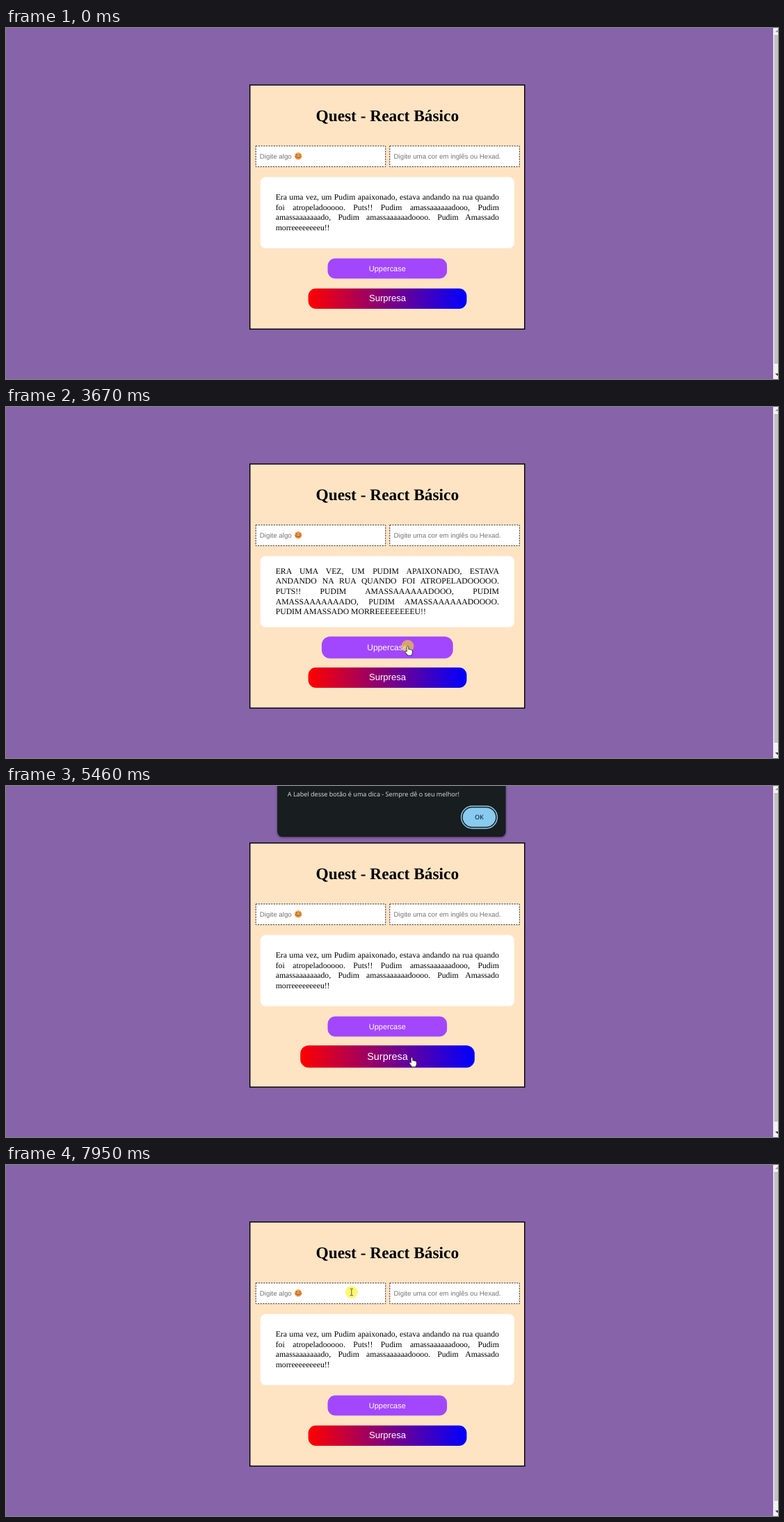
These frames come from a looping animation (1110 px wide and 505 px high, 8 s). An HTML page:

```html
<!DOCTYPE html>
<html lang="pt-BR">
<head>
<meta charset="utf-8">
<title>Quest - React Básico</title>
<style>
  html, body { margin: 0; width: 100%; height: 100%; overflow: hidden; background: #8763a9; }
  svg { display: block; width: 1110px; height: 505px; }
  text { text-rendering: geometricPrecision; }
  .serif { font-family: "Liberation Serif", "Times New Roman", serif; }
  .sans { font-family: "Liberation Sans", Arial, sans-serif; }
  .ui { font-family: "Open Sans", "Noto Sans", sans-serif; }
  .middle { text-anchor: middle; }
  .hint { font-size: 9.73px; fill: #757575; }
  .field { fill: #fff; stroke: #000; stroke-width: .8; stroke-dasharray: 2.19 1.46; }
  .story {
    display: flex; align-items: center; width: 440px; height: 140px;
    font-size: 16px; line-height: 20px; color: #000; text-align: justify;
    text-rendering: geometricPrecision;
  }
  .story p { margin: 0; width: 440px; }
  .upper { text-transform: uppercase; }
  #cursor path { fill: #fff; stroke: #111; stroke-width: .8; stroke-linejoin: round; }
  #cursor #beam { fill: none; stroke: #333; }
</style>
</head>
<body>
<svg viewBox="0 0 1110 505">
  <defs>
    <linearGradient id="redBlue"><stop stop-color="#f00"/><stop offset="1" stop-color="#00f"/></linearGradient>
    <filter id="shadow" x="-5%" y="-20%" width="110%" height="150%">
      <feDropShadow dx="0" dy="1" stdDeviation="1.5" flood-color="#000" flood-opacity=".5"/>
    </filter>
  </defs>

  <rect width="1110" height="505" fill="#8763a9"/>

  <!-- scrollbar -->
  <rect x="1103" width="7" height="505" fill="#f1f1f1"/>
  <rect x="1104.4" y="10" width="6" height="473" fill="#c1c1c1"/>
  <path d="M1106 6l3.2-3.4 3.2 3.4z" fill="#a0a0a0"/>
  <path d="M1106 497l3.2 3.4 3.2-3.4z" fill="#404040"/>

  <!-- card -->
  <rect x="350.7" y="82" width="395" height="351.2" fill="#ffe4c4" stroke="#000" stroke-width="1.46"/>
  <text class="serif middle" x="548.3" y="133.7" font-size="23.36" font-weight="700">Quest - React Básico</text>

  <rect class="field" x="359.2" y="169.8" width="186.5" height="29.8"/>
  <text class="sans hint" x="364.8" y="187.8">Digite algo</text>
  <g transform="translate(420.2 184.2)">
    <circle r="5.2" fill="#eda04a"/>
    <circle cx="-3.2" cy="1" r="1.3" fill="#e0703f"/>
    <circle cx="3.2" cy="1" r="1.3" fill="#e0703f"/>
    <path d="M-3.2-1.1q1.1-1.6 2.2 0M1-1.1q1.1-1.6 2.2 0M-2.5 1.5q2.5 2.6 5 0" fill="none" stroke="#5e3a2c" stroke-width=".9"/>
  </g>
  <rect class="field" x="551.8" y="169.8" width="186.5" height="29.8"/>
  <text class="sans hint" x="557.6" y="187.8">Digite uma cor em inglês ou Hexad.</text>

  <rect x="365.8" y="214.6" width="365" height="102.2" rx="7.3" fill="#fff"/>
  <foreignObject width="440" height="140" transform="translate(387.7 215) scale(.73)">
    <div class="story serif"><p id="story">Era uma vez, um Pudim apaixonado, estava andando na rua quando foi atropeladooooo. Puts!! Pudim amassaaaaaadooo, Pudim amassaaaaaaado, Pudim amassaaaaaadoooo. Pudim Amassado morreeeeeeeeu!!</p></div>
  </foreignObject>

  <g id="caseButton">
    <rect x="-85.8" y="-14.4" width="171.6" height="28.8" rx="11" fill="#a347ff"/>
    <text class="sans middle" y="3.8" font-size="10.95" fill="#fff">Uppercase</text>
  </g>
  <g id="surpriseButton">
    <rect x="-113.9" y="-14.6" width="227.8" height="29.2" rx="11" fill="url(#redBlue)"/>
    <text class="sans middle" y="4" font-size="13.14" fill="#fff">Surpresa</text>
  </g>

  <g id="dialog" class="ui">
    <g transform="translate(-554.3)">
      <rect x="390.6" y="-30" width="327.4" height="106.8" rx="7.5" fill="#181c1e" filter="url(#shadow)"/>
      <text x="405.3" y="19.2" font-size="9.05" fill="#e3e6e8">A Label desse botão é uma dica - Sempre dê o seu melhor!</text>
      <rect x="654.2" y="32.9" width="51.6" height="31.8" rx="15.9" fill="none" stroke="#8bd3f5" stroke-width="1.4"/>
      <rect x="656.4" y="35" width="47.2" height="27.6" rx="13.8" fill="#8acdf1"/>
      <text class="middle" x="680" y="52.1" font-size="9" font-weight="600" fill="#143a4c">OK</text>
    </g>
  </g>

  <g id="cursor">
    <circle id="glow" r="9" fill="#fff000" fill-opacity=".55"/>
    <path id="arrow" d="M0 0V9.9L2.2 7.9 3.7 11.4 5.3 10.7 3.8 7.3H6.8Z"/>
    <path id="hand" d="M-1.3 1Q0-.8 1.3 1V4.5Q2.5 3.8 3.3 4.9 4.6 4.4 5.2 5.6 6.7 5.3 6.9 6.9V9.6Q6.8 11.4 5.8 12.2V13.7H-.4V12.5Q-2 10.8-3.6 8.4-3.8 6.6-2.3 7L-1.3 8Z"/>
    <path id="beam" d="M-2.2-4.7H-.6L0-4.2.6-4.7H2.2M0-4.2V4.4M-2.2 4.9H-.6L0 4.4.6 4.9H2.2"/>
  </g>
</svg>
<script>
const LOOP = 8000, TICK = 68, PRESS = 66, FADE = 130, SETTLE = 200;
const el = id => document.getElementById(id);
const clamp = v => Math.min(1, Math.max(0, v));
const easeOut = (v, power) => 1 - (1 - v) ** power;

const entry = { at: 1100, x: 1075, y: 489 };

// pointer moves; easeX and easeY are ease-out powers
const moves = [
  { from: 1170, to: 1170, x: 1096, y: 494 },
  { from: 1302, to: 1710, x: 765, y: 422 },
  { from: 1710, to: 2130, x: 577.5, y: 344, easeY: 1.5 },
  { from: 4730, to: 5130, x: 583.5, y: 390.5 },
  { from: 6186, to: 7000, x: 686, y: 42, easeX: 6, easeY: 4 },
  { from: 7332, to: 7880, x: 496.8, y: 182.8, easeX: 1.5 }
];

const clicks = { upper: 2330, lower: 3670, open: 5324, close: 7200, focus: 7945 };
const released = name => clicks[name] + PRESS;

const buttons = {
  caseButton: { x: 548.3, y: 346, w: 171.6, h: 28.8 },
  surpriseButton: { x: 548.5, y: 389.3, w: 227.8, h: 29.2 }
};
const fields = [
  { x: 452.5, y: 184.7, w: 186.5, h: 29.8 },
  { x: 645, y: 184.7, w: 186.5, h: 29.8 }
];

const inside = (p, box) => Math.abs(p.x - box.x) < box.w / 2 && Math.abs(p.y - box.y) < box.h / 2;

// Position advances once per tick within each move.
function pointer(t) {
  let { x, y } = entry;
  for (const { from, to, easeX = 1, easeY = 1, ...goal } of moves) {
    if (t < from) break;
    const elapsed = Math.floor((t - from) / TICK) * TICK;
    const k = t >= to ? 1 : elapsed / (to - from);
    x += (goal.x - x) * easeOut(k, easeX);
    y += (goal.y - y) * easeOut(k, easeY);
  }
  return { x, y };
}

function cursorShape(t, p, hover, modal) {
  if (t < entry.at) return "";
  if (modal && p.y < 77) return "arrow";
  if (hover) return "hand";
  return fields.some(box => inside(p, box)) ? "beam" : "arrow";
}

function place(id, x, y, scale = 1) {
  el(id).setAttribute("transform", `translate(${x} ${y}) scale(${scale})`);
}

function show(id, opacity) {
  el(id).setAttribute("opacity", +opacity);
}

function renderDialog(t) {
  const k = clamp((t - released("open")) / SETTLE);
  const rest = (1 - k) ** 2;
  const leaving = clamp((t - released("close")) / FADE);
  place("dialog", 554.3, -9.5 * rest, 1 + .008 * rest);
  show("dialog", k > 0 ? clamp(.62 + k) * (1 - leaving) : 0);
}

function render(t) {
  const during = (start, end) => t >= released(start) && t < released(end);
  const p = pointer(t);
  const modal = during("open", "close");
  // The page keeps its hover state while the dialog is open.
  const pagePoint = modal ? pointer(released("open")) : p;
  const hover = t >= entry.at && Object.keys(buttons).find(id => inside(pagePoint, buttons[id]));

  for (const [id, { x, y }] of Object.entries(buttons)) place(id, x, y, hover === id ? 1.1 : 1);
  el("story").className = during("upper", "lower") ? "upper" : "";
  renderDialog(t);

  const shape = cursorShape(t, p, hover, modal);
  place("cursor", p.x, p.y);
  for (const id of ["arrow", "hand", "beam"]) show(id, shape === id);
  show("glow", Object.values(clicks).some(at => t >= at && t < at + PRESS));
}

function frame() {
  render(performance.now() % LOOP);
  requestAnimationFrame(frame);
}
frame();
</script>
</body>
</html>
```
